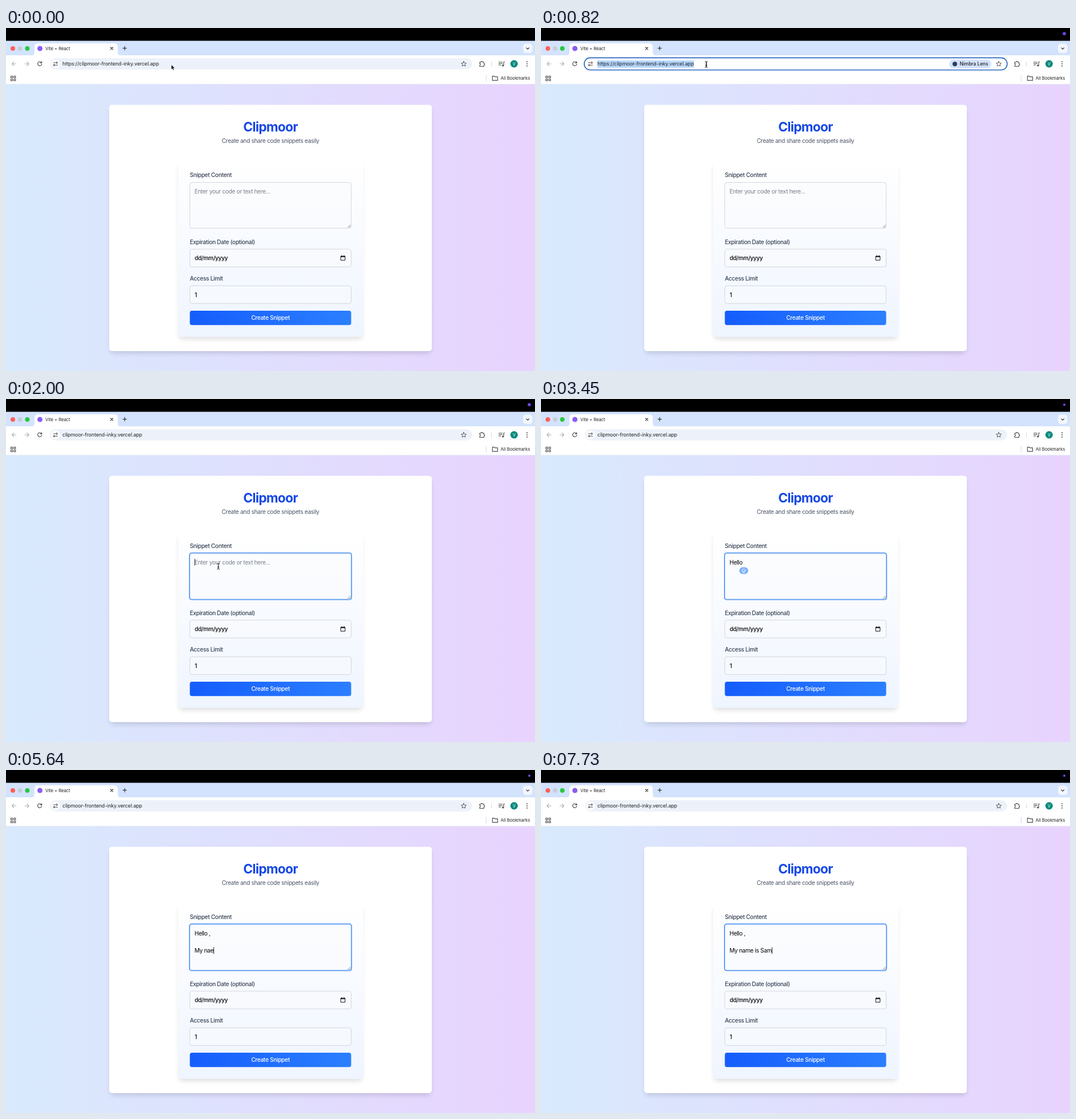
Animation, 928 px wide and 603 px high, one loop 8000 ms. Source, as an HTML page:

```html
<!DOCTYPE html>
<html lang="en">
<head>
<meta charset="utf-8">
<title>Snippet form</title>
<style>
html, body { margin: 0; width: 100%; height: 100%; overflow: hidden; background: #000; }
svg { display: block; width: 928px; height: 603px; }
text { font-family: Inter, "Liberation Sans", sans-serif; white-space: pre; }
.page { font-size: 10.1px; letter-spacing: -.03em; fill: #000; }
.label { font-weight: 500; fill: #364153; }
.ui { font-size: 7.6px; fill: #1f1f1f; }
.url { font-size: 8.8px; letter-spacing: -.008em; fill: #1f2023; }
.icon { fill: none; stroke: #474747; stroke-width: 1.1; stroke-linecap: round; stroke-linejoin: round; }
.field { fill: #f9fbfe; fill-opacity: .55; stroke: #d3d7dd; stroke-width: 1; }
.mid { text-anchor: middle; }
</style>
</head>
<body>
<svg viewBox="0 0 928 603" xmlns="http://www.w3.org/2000/svg">
  <defs>
    <linearGradient id="sky"><stop stop-color="#d8eafd"/><stop offset="1" stop-color="#e8d3fe"/></linearGradient>
    <linearGradient id="panel" x2="0" y2="1"><stop stop-color="#fff"/><stop offset="1" stop-color="#eff5ff"/></linearGradient>
    <linearGradient id="action"><stop stop-color="#155dfc"/><stop offset="1" stop-color="#2b7fff"/></linearGradient>
    <filter id="soft" x="-10%" y="-10%" width="120%" height="120%"><feGaussianBlur stdDeviation="4.5"/></filter>
  </defs>

  <!-- window frame -->
  <rect width="928" height="603" fill="#000"/>
  <circle id="dot" cx="918" cy="10" fill="#6a4cf0"/>
  <rect y="22.5" width="928" height="26" fill="#d3e3fd"/>
  <circle cx="12" cy="36" r="4" fill="#ff5f57"/>
  <circle cx="24.7" cy="36" r="4" fill="#c8ced8"/>
  <circle cx="37.4" cy="36" r="4" fill="#28c840"/>
  <path d="M44 48.5q6 0 6-6V33q0-6 6-6H190q6 0 6 6v9.500q0 6 6 6z" fill="#fff"/>
  <rect y="48" width="928" height="51" fill="#fff"/>
  <circle id="favicon" cx="59.500" cy="36" r="4.500" fill="#8b5cf6"/>
  <circle id="spinner" class="icon" cx="59.500" cy="36" r="4" stroke-dasharray="17 9" style="stroke:#0b57d0"/>
  <text class="ui" x="69" y="38.700">Vite + React</text>
  <path class="icon" d="M183.500 34l4 4m0-4l-4 4M205 35.500h6.400m-3.200-3.200v6.400" style="stroke:#222"/>
  <rect x="907" y="27.500" width="16.500" height="16.500" rx="5" fill="#f2f6fe"/>
  <path class="icon" d="M912.800 34.800l2.400 2.400 2.400-2.400" style="stroke:#222"/>

  <!-- toolbar -->
  <path class="icon" d="M17.800 63h-7.200m3.300-3.300L10.600 63l3.300 3.300M33 63h7.200m-3.300-3.300l3.300 3.300-3.300 3.300" style="stroke:#a9adb3"/>
  <g class="icon">
    <path id="reload" d="M62.300 61a3.600 3.600 0 1 0 .4 2.600M62.700 59v2.400h-2.400"/>
    <path id="stop" d="M56.300 60l6 6m0-6l-6 6"/>
  </g>
  <rect id="bar" rx="10.500"/>
  <circle cx="87" cy="63" r="7.500" fill="#fff"/>
  <path class="icon" d="M83.300 61h3M87 65.200h3.500"/>
  <g class="icon"><circle cx="89" cy="61" r="1.200"/><circle cx="84.500" cy="65.200" r="1.200"/></g>
  <rect id="selection" x="99" y="57.200" height="12.500" fill="#b4d5fb"/>
  <text id="url" class="url" x="99" y="66.200"></text>
  <g id="lens">
    <rect x="716" y="55.500" width="74" height="15.500" rx="7.700" fill="#d3e3fd"/>
    <circle cx="726" cy="63.200" r="4" fill="#2b3c5c"/>
    <text class="ui" x="734.500" y="66.300" style="font-size:8.300px;font-weight:500">Nimbra Lens</text>
  </g>
  <path class="icon" d="M803 58.700l1.300 2.900 3.200.3-2.400 2.100.7 3.100-2.800-1.600-2.800 1.600.7-3.100-2.400-2.100 3.200-.3z" style="stroke-width:.9"/>
  <path class="icon" d="M831 60h2.300a1.400 1.400 0 0 1 2.800 0h2.200v2.300a1.400 1.400 0 0 1 0 2.800v2.400H831v-2.300a1.400 1.400 0 0 0 0-2.800z"/>
  <path d="M851.500 59v8.500M842.300 83v11" stroke="#c9dafa"/>
  <path class="icon" d="M864.500 60h6m-6 2.500h6m-6 2.500h3.500m5 1v-6.300h1.600"/>
  <circle cx="871.600" cy="66" r="1.500" fill="#474747"/>
  <circle cx="891.300" cy="63" r="6.500" fill="#05897c"/>
  <text class="ui mid" x="891.300" y="65.600" style="fill:#fff;font-size:7px">V</text>
  <g fill="#474747"><circle cx="914" cy="59.300" r="1"/><circle cx="914" cy="63" r="1"/><circle cx="914" cy="66.700" r="1"/></g>
  <path class="icon" d="M8.500 84.500h3v3h-3zm5.300 0h3v3h-3zm-5.300 5.300h3v3h-3zm5.300 0h3v3h-3z"/>
  <path class="icon" d="M853.300 84.600h3.200l1.300 1.300h4.700v6.200h-9.200z"/>
  <text class="ui" x="867.800" y="91">All Bookmarks</text>

  <!-- page -->
  <rect y="99" width="928" height="504" fill="url(#sky)"/>
  <path d="M0 98.800h928" stroke="#dde4ee" stroke-width=".7"/>
  <rect x="183" y="143" width="562" height="429" rx="5" opacity=".13" filter="url(#soft)"/>
  <rect x="181" y="135" width="566" height="433" rx="5" fill="#fff"/>
  <text class="mid" x="464" y="181.700" style="font-size:22.700px;font-weight:700;letter-spacing:-.03em;fill:#1447e6">Clipmoor</text>
  <text class="page mid" x="464" y="201.800" style="fill:#4a5565">Create and share code snippets easily</text>
  <rect x="303.500" y="242" width="321" height="305" rx="5" opacity=".12" filter="url(#soft)"/>
  <rect x="302" y="234" width="325" height="309" rx="5" fill="url(#panel)"/>

  <text class="page label" x="322.500" y="262.300">Snippet Content</text>
  <rect class="field" x="322.500" y="271.500" width="283" height="80.500" rx="3.800"/>
  <rect id="ring" x="321.900" y="270.700" width="284.300" height="82" rx="4" fill="none" stroke="#5b9df7" stroke-width="1.800"/>
  <path d="M599.500 351l5-5m-2 5l2-2" stroke="#666" stroke-width=".8"/>
  <text id="hint" class="page" x="330.700" y="290.700" style="fill:#79818c">Enter your code or text here...</text>
  <text id="line0" class="page" x="330.700" y="290.700"></text>
  <text id="line2" class="page" x="330.700" y="321.200"></text>
  <path id="caret" d="M.5-6v12" stroke="#111" stroke-width=".9"/>
  <g id="caps">
    <rect x="-7.800" y="-6" width="15.600" height="12" rx="6" fill="#7db0f8"/>
    <path d="M0-3.800L3.600-.2H1.800v2.200h-3.600V-.2h-1.800zM-1.800 3.600h3.600" fill="none" stroke="#fff" stroke-width=".9"/>
  </g>

  <text class="page label" x="322.500" y="379.700">Expiration Date (optional)</text>
  <rect class="field" x="322.500" y="388.800" width="283" height="31.200" rx="3.800"/>
  <text class="page" x="331" y="408.300" style="font-weight:500">dd/mm/yyyy</text>
  <path d="M587.200 401.200h7.600v7h-7.600z" fill="none" stroke="#111"/>
  <path d="M587 402h8M589 399.800v1.500m4-1.500v1.500" stroke="#111" stroke-width="1.300"/>
  <text class="page label" x="322.500" y="443.900">Access Limit</text>
  <rect class="field" x="322.500" y="453.200" width="283" height="31.200" rx="3.800"/>
  <text class="page" x="331" y="472.500" style="font-weight:500">1</text>
  <rect x="322.500" y="497" width="283" height="25.200" rx="3.800" fill="url(#action)"/>
  <text class="page mid" x="464" y="513.400" style="font-weight:500;fill:#fff">Create Snippet</text>

  <!-- pointers -->
  <path id="arrow" d="M290 64.500v8.800l2-1.900 1.400 3.200 1.500-.7-1.400-3.100h2.800z" fill="#000" stroke="#fff" stroke-width=".7"/>
  <g id="beam" fill="none" stroke-linecap="round">
    <path d="M-2-5.200q2 0 2 1.500v7.400q0 1.500-2 1.500M2-5.200q-2 0-2 1.500v7.400q0 1.500 2 1.500M-1.200 1.500h2.400" stroke="#fff" stroke-width="2" opacity=".8"/>
    <path d="M-2-5.200q2 0 2 1.500v7.400q0 1.500-2 1.500M2-5.200q-2 0-2 1.500v7.400q0 1.500 2 1.500M-1.200 1.500h2.400" stroke="#111"/>
  </g>
</svg>
<script>
const LOOP = 8000;
const HOST = "clipmoor-frontend-inky.vercel.app";
const el = id => document.getElementById(id);
const show = (id, on) => el(id).setAttribute("visibility", on ? "visible" : "hidden");
const place = (id, x, y) => el(id).setAttribute("transform", `translate(${x} ${y})`);
const set = (id, attrs) => { for (const k in attrs) el(id).setAttribute(k, attrs[k]); };
const clamp = v => Math.min(1, Math.max(0, v));
const ease = v => v * v * (3 - 2 * v);
const write = (id, s) => { if (el(id).textContent !== s) el(id).textContent = s; };

// [start, typed text, caret visible, caps-lock badge]
const edits = [
  [0, "", 0], [2000, "", 1], [2270, "", 0], [2450, "H", 1], [2640, "He", 1],
  [2820, "Hel", 1], [2910, "Hell", 1], [3000, "Hello", 1], [3090, "Hello ", 1],
  [3450, "Hello ", 0, 1], [3550, "Hello S", 1], [3730, "Hello Sa", 1],
  [4000, "Hello S", 1], [4090, "Hello ", 1], [4450, "Hello ", 0], [4550, "Hello ,", 1],
  [4730, "Hello ,\n", 1], [4910, "Hello ,\n\n", 1],
  ..."My nae".split("").map((c, i, all) =>
    [5180 + i * 92, "Hello ,\n\n" + all.slice(0, i + 1).join(""), 1]),
  ...[[5910, "My na", 1], [6180, "My nam", 1], [6270, "My name ", 1], [6360, "My name i", 1],
    [6450, "My name is ", 1], [6820, "My name is ", 0], [7180, "My name is ", 1],
    [7360, "My name is ", 1, 1], [7450, "My name is S", 1], [7550, "My name is Sa", 1],
    [7730, "My name is Sam", 1]].map(([at, s, ...rest]) => [at, "Hello ,\n\n" + s, ...rest])
];

function drawEditor(t) {
  const [, typed, caretOn, caps] = edits.filter(e => e[0] <= t).pop();
  const lines = typed.split("\n");
  const row = lines.length - 1;
  write("line0", lines[0]);
  write("line2", lines[2] || "");
  show("hint", !typed);
  show("ring", t >= 2000);
  const width = lines[row] ? el("line" + row).getComputedTextLength() : 0;
  const x = 330.6 + width, y = 287 + row * 15.2;
  place("caret", x, y);
  show("caret", caretOn);
  place("caps", x - .3, y + 14.8);
  show("caps", caps);
}

function drawBrowser(t) {
  const focused = t >= 540 && t < 1180;
  const loading = t >= 1180 && t < 1450;
  write("url", (t < 1180 ? "https://" : "") + HOST);
  set("bar", focused
    ? { x: 75.8, y: 52.4, width: 742, height: 21.4, fill: "#fff", stroke: "#2b66c4", "stroke-width": 1.6 }
    : { x: 77, y: 53, width: 741, height: 20, fill: "#edf2fa", stroke: "none" });
  el("selection").setAttribute("width", el("url").getComputedTextLength());
  show("selection", focused);
  show("lens", focused && t >= 640);
  show("favicon", !loading);
  show("spinner", loading);
  set("spinner", { transform: `rotate(${t * .5} 59.5 36)` });
  show("stop", t >= 1180 && t < 1360);
  show("reload", t < 1180 || t >= 1360);
  show("dot", t >= 450);
  el("dot").setAttribute("r", 2.8 - .8 * clamp((t - 2270) / 180));
}

function drawPointer(t) {
  const p = ease(clamp((t - 1590) / 370));
  show("arrow", t < 360);
  show("beam", t >= 360 && t < 2450);
  place("beam", 290 + 82.5 * p, 64 + 230 * p);
}

const begin = performance.now();
function frame() {
  const t = (performance.now() - begin) % LOOP;
  drawBrowser(t);
  drawEditor(t);
  drawPointer(t);
  requestAnimationFrame(frame);
}
frame();
</script>
</body>
</html>
```
